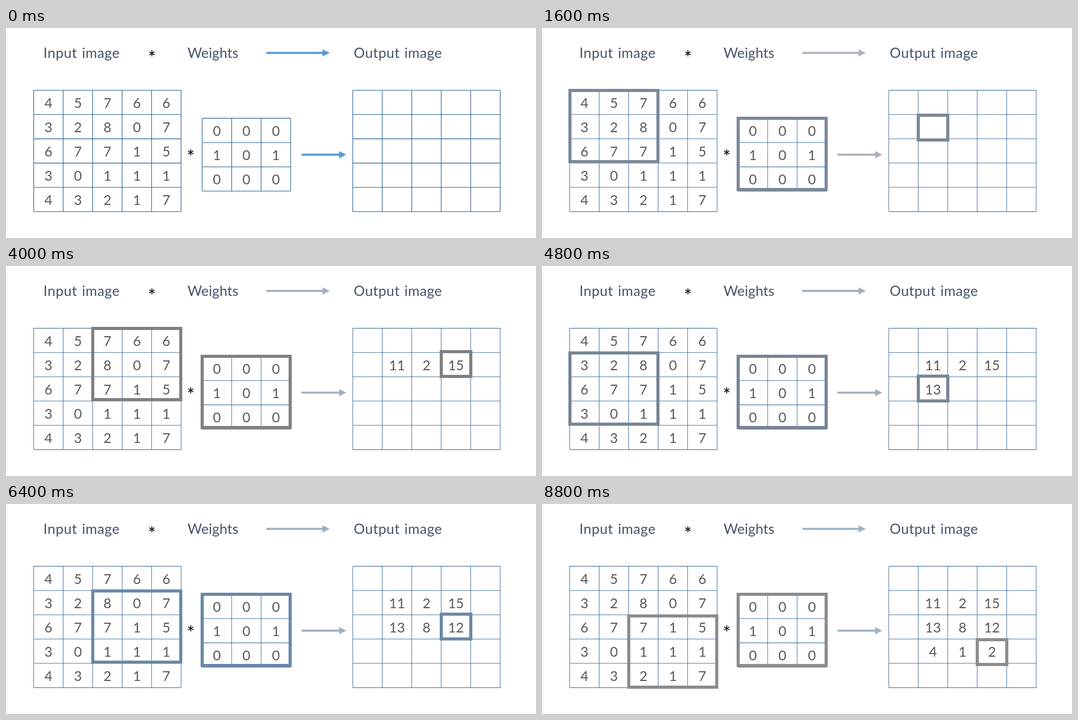
An HTML page for the animation above (9600 ms loop, 1024 by 407 pixels).

```html
<!DOCTYPE html>
<html lang="en">
<head>
<meta charset="utf-8">
<title>Convolution</title>
<style>
  html, body { margin: 0; width: 100%; height: 100%; overflow: hidden; background: #fff; }
  svg { display: block; width: 1024px; height: 407px; }
  text { font-family: Lato, "Open Sans", sans-serif; }
  .label { font-size: 27px; fill: #44546a; word-spacing: 1.6px; }
  .digit { font-size: 26.5px; fill: #595959; text-anchor: middle; }
  .star { font-size: 36px; fill: #000; text-anchor: middle; }
  .box { fill: none; stroke-width: 6; }
  .grid { fill: none; stroke: #41719c; }
</style>
</head>
<body>
<svg id="stage" viewBox="0 0 1024 407"></svg>
<script>
const STEP = 800, STEPS = 12;
const CELL_W = 56.95, CELL_H = 47.05;
const stage = document.getElementById("stage");

const image = ["45766", "32807", "67715", "30111", "43217"];
const weights = ["000", "101", "000"];

// One entry per step: highlight colour, arrow colour
const tones = [
  ["none", "#5b9bd5"],
  ["#7b8899", "#abb1bf"], ["#7b8899", "#abb1bf"], ["#7b8899", "#abb1bf"],
  ["#808080", "#a5b0bd"], ["#808080", "#a5b0bd"],
  ["#778595", "#a3aebc"], ["#778595", "#a3aebc"],
  ["#6888a8", "#9eb0c2"],
  ["#8c8c8c", "#9db3c8"], ["#8c8c8c", "#9db3c8"], ["#8c8c8c", "#9db3c8"]
];
// Top edges of the moving frames, by window position
const inTop = [121, 121, 121, 168.5, 168.5, 168.5, 214, 217, 217];
const outTop = [169, 166, 166, 213.5, 213.5, 213.5, 264.5, 263, 263];

function add(tag, attrs, content) {
  const el = document.createElementNS("http://www.w3.org/2000/svg", tag);
  for (const key in attrs) el.setAttribute(key, attrs[key]);
  if (content !== undefined) el.textContent = content;
  return stage.appendChild(el);
}

function grid(x, y, n) {
  const w = n * CELL_W, h = n * CELL_H;
  let d = "";
  for (let i = 0; i <= n; i++) {
    d += `M${x + i * CELL_W} ${y}v${h}M${x} ${y + i * CELL_H}h${w}`;
  }
  return add("path", { class: "grid", d });
}

function digit(x, y, col, row, value) {
  return add("text", {
    class: "digit",
    x: x + (col + 0.5) * CELL_W,
    y: y + (row + 0.5) * CELL_H + 10.8
  }, value);
}

function fill(x, y, rows) {
  rows.forEach((line, r) => [...line].forEach((v, c) => digit(x, y, c, r, v)));
}

function label(x, spacing, content) {
  add("text", { class: "label", x, y: 58, "letter-spacing": spacing }, content);
}

function star(cx, cy) {
  const ctx = document.createElement("canvas").getContext("2d");
  ctx.font = '36px Lato, "Open Sans", sans-serif';
  const m = ctx.measureText("*");
  const y = cy + (m.actualBoundingBoxAscent - m.actualBoundingBoxDescent) / 2;
  add("text", { class: "star", x: cx, y }, "*");
}

function arrow(x1, x2, y) {
  const neck = x2 - 14;
  return add("path", {
    d: `M${x1} ${y - 2}H${neck}V${y - 7}L${x2} ${y}L${neck} ${y + 7}V${y + 2}H${x1}Z`
  });
}

function box(x, y, w, h) {
  return add("rect", { class: "box", x, y, width: w, height: h });
}

label(72.3, 0.6, "Input image");
label(350.8, 0.1, "Weights");
label(671.8, 0.5, "Output image");
star(282, 48.5);
star(357, 241);

const grids = [grid(53.5, 120.6, 5), grid(379, 175, 3), grid(670, 120.6, 5)];
fill(53.5, 120.6, image);
fill(379, 175, weights);

// Each result is the window's weighted sum
const results = inTop.map((_, p) => {
  const r = Math.floor(p / 3), c = p % 3;
  let sum = 0;
  weights.forEach((line, i) => [...line].forEach((w, j) => {
    sum += w * image[r + i][c + j];
  }));
  return digit(670, 120.6, c + 1, r + 1, sum);
});

const arrows = [arrow(503, 625.5, 48.3), arrow(571, 657.5, 245.6)];
const inBox = box(54, 121, 170, 138);
const weightBox = box(379, 175, 170, 138);
const outBox = box(727, 169, 57, 48);

function show(step) {
  const [frameTone, arrowTone] = tones[step];
  const pos = step < 4 ? 0 : step - 3;
  const done = step < 3 ? 0 : step - 2;
  const moving = step > 1 ? frameTone : "none";

  grids.forEach(g => g.setAttribute("stroke-width", step ? 1.05 : 1.35));
  arrows.forEach(a => a.setAttribute("fill", arrowTone));
  results.forEach((t, i) => t.setAttribute("visibility", i < done ? "visible" : "hidden"));

  weightBox.setAttribute("stroke", frameTone);
  inBox.setAttribute("stroke", moving);
  outBox.setAttribute("stroke", moving);
  inBox.setAttribute("x", 54 + pos % 3 * 56.8);
  inBox.setAttribute("y", inTop[pos]);
  outBox.setAttribute("x", 727 + pos % 3 * 57);
  outBox.setAttribute("y", outTop[pos]);
}

let current = -1;
const start = performance.now();
function tick() {
  const step = Math.floor((performance.now() - start) / STEP) % STEPS;
  if (step !== current) show(current = step);
  requestAnimationFrame(tick);
}
tick();
</script>
</body>
</html>
```
